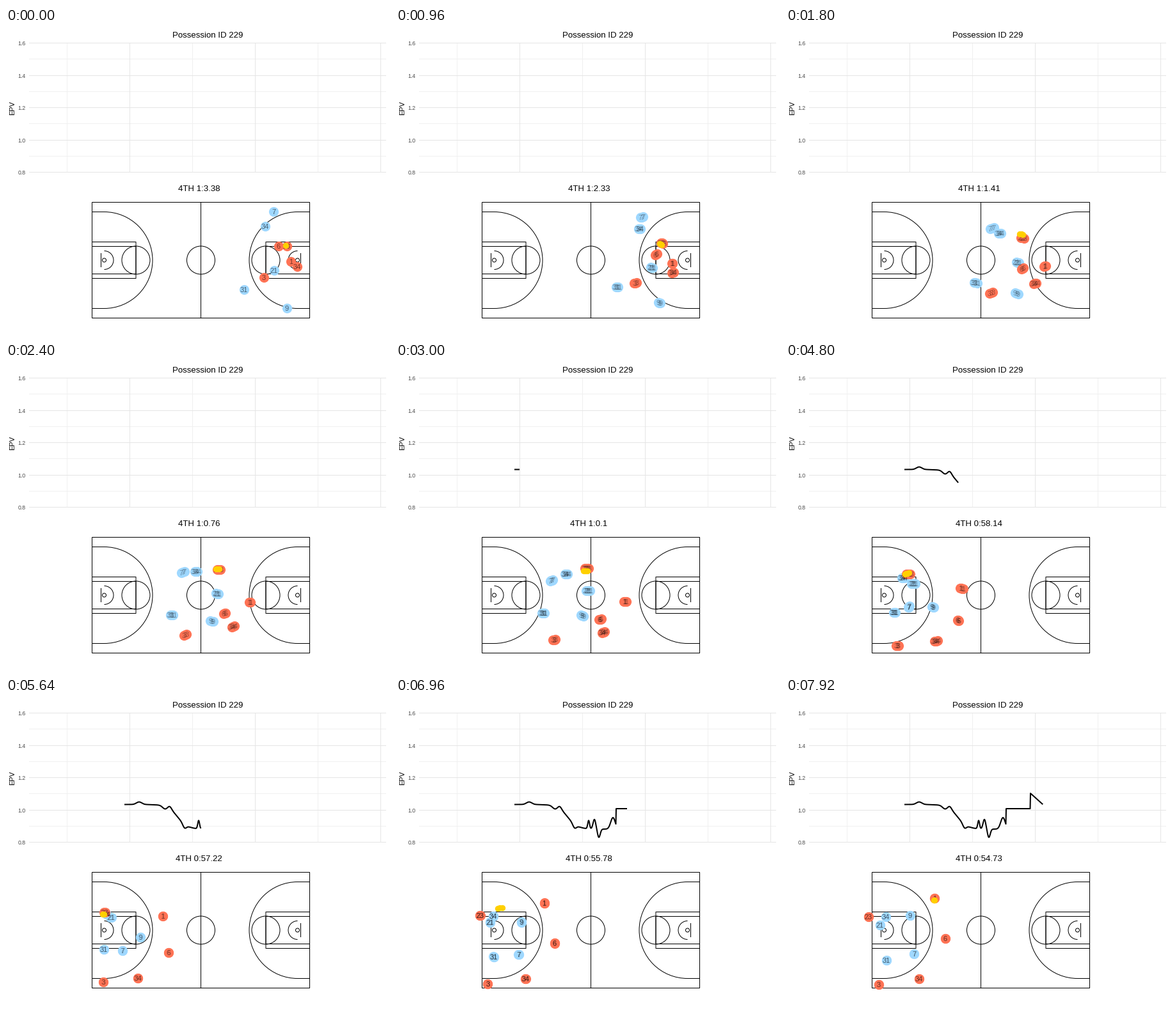
These frames come from a looping animation (600x480 px, 8000 ms). A matplotlib script:

```python
import numpy as np
import matplotlib.pyplot as plt
from matplotlib.animation import FuncAnimation
from matplotlib.patches import Arc, Circle, Rectangle

W, H, DPI = 600, 480, 100
PX = 72 / DPI                 # points per pixel
SUB = 3                       # drawn frames per step
FRAMES, INTERVAL = 200, 40
SAMPLE = 0.305                # one tracking sample, in steps
LAST = 66
PASS, CATCH = 55, 62.5

BLUE, RED, GOLD = "#9fd8ff", "#ff7355", "#ffd000"

# Each run: start, midcourt, set-up spot and end, reached at these steps
KNOTS = np.array([0, 25, 47, LAST], float)
AWAY = {
    "7": [(418, 287), (243, 340), (182, 395), (200, 400)],
    "34": [(405, 310), (266, 330), (157, 338), (156, 342)],
    "21": [(419, 379), (300, 356), (164, 343), (147, 355)],
    "31": [(372, 409), (230, 391), (153, 393), (157, 410)],
    "9": [(439, 438), (291, 395), (210, 374), (194, 340)],
}
HOME = {
    "23": [(439, 341), (298, 321), (154, 335), (129, 342)],
    "6": [(426, 341), (319, 401), (254, 398), (249, 376)],
    "1": [(445, 365), (358, 373), (245, 341), (232, 313)],
    "34": [(455, 373), (324, 421), (206, 438), (208, 439)],
    "3": [(403, 390), (247, 433), (152, 444), (145, 448)],
}


def run(points, t):
    """Smooth curve through the key points, at rest at both ends."""
    p = np.array(points, float)
    v = np.gradient(p, KNOTS, axis=0)
    v[[0, -1]] = 0
    t = min(max(t, 0), LAST)
    i = min(np.searchsorted(KNOTS, t, side="right") - 1, len(KNOTS) - 2)
    d = KNOTS[i + 1] - KNOTS[i]
    u = (t - KNOTS[i]) / d
    return ((1 + 2 * u) * (1 - u) ** 2 * p[i] + u * (1 - u) ** 2 * d * v[i]
            + u * u * (3 - 2 * u) * p[i + 1] + u * u * (u - 1) * d * v[i + 1])


def dribble(t):
    return run(HOME["23"], t) + (-2, 5 * np.cos((t - 25) * np.pi / 10) - 1)


def ball_at(t):
    if t < PASS:
        return dribble(t)
    u = min((t - PASS) / (CATCH - PASS), 1) ** 1.3
    caught = run(HOME["1"], max(t, CATCH)) + (-0.5, 3)
    return dribble(PASS) * (1 - u) + caught * u


def samples(step):
    """Tracking samples that show together in one step."""
    if step == 0:
        return [0.0]
    n = (3 if step < 44 else 2) + (step % 3 == 1)
    return [step + (j - (n - 1) / 2) * SAMPLE for j in range(n)]


def clock(step):
    mins, secs = divmod(63.38 - 0.13106 * step, 60)
    digits = f"{secs:.2f}".rstrip("0").rstrip(".")
    return f"4TH {int(mins)}:{digits}"


def value_curve(x):
    """Slow fall with bumps, then flat during the pass, then a jump and decline."""
    y = 166.5 + 38.5 / (1 + np.exp((268 - x) / 8))
    for centre, width, height in ((208, 6, -4), (248, 5, 4), (256, 4, -4), (279, 4, 6),
                                  (301, 2, -13), (310, 3, -15), (317, 3, 13), (339, 5, -18)):
        y = y + height * np.exp(-((x - centre) / width) ** 2)
    y = np.where(x > 343.5, 173, y)
    return np.where(x > 381.5, 149 + 0.9 * (x - 382), y)


plt.rcParams["font.family"] = "Liberation Sans"
plt.rcParams["path.snap"] = False
fig = plt.figure(figsize=(W / DPI, H / DPI), dpi=DPI, facecolor="white")
ax = fig.add_axes([0, 0, 1, 1])
ax.set_xlim(0, W)
ax.set_ylim(H, 0)
ax.axis("off")


def line(xs, ys, color="black", width=1.0, z=2):
    return ax.plot(xs, ys, color=color, lw=width * PX, zorder=z,
                   solid_capstyle="projecting", solid_joinstyle="round")[0]


def label(x, y, s, px, **kw):
    kw = {"ha": "center", "va": "baseline", "zorder": 5, **kw}
    return ax.text(x, y, s, fontsize=px * PX, **kw)


def ring(x, r):
    ax.add_patch(Circle((x, 363), r, fill=False, lw=PX, zorder=2))


def draw_chart():
    minor, major = "#f0f0f0", "#e5e5e5"
    for i in range(6):
        x = 95.5 + 98 * i
        line([x, x], [24, 225], major if i % 2 else minor, 1, i % 2)
    for i in range(9):
        y = int(23.5 + 25.25 * i) + 0.5
        line([36.5, 593.5], [y, y], minor if i % 2 else major, 1, 1 - i % 2)
        if i % 2 == 0:
            label(31, y + 3.5, f"{1.6 - 0.1 * i:.1f}", 8.8, ha="right", color="#4d4d4d")
    label(315, 15, "Possession ID 229", 13.2)
    label(10, 125, "EPV", 11, rotation=90, va="center")


def draw_half(flip):
    def fx(x):
        return 609 - x if flip else x

    def arc(x, r):
        a = (90, 270) if flip else (-90, 90)
        ax.add_patch(Arc((fx(x), 363), 2 * r, 2 * r, theta1=a[0], theta2=a[1],
                         lw=PX, color="black", zorder=2))

    for y in (287.5, 438.5):
        line([fx(134.5), fx(153.5)], [y, y])
    arc(153.5, 75.5)
    arc(153.5, 14.5)
    ring(fx(153.5), 3)
    ring(fx(203), 22)
    for top, bottom in ((334.5, 391.5), (341.5, 384.5)):
        line([fx(x) for x in (134.5, 203, 203, 134.5)], [top, top, bottom, bottom])
    line([fx(148.5)] * 2, [352.5, 373.5])


def draw_court():
    ax.add_patch(Rectangle((134.5, 272.5), 340, 181, fill=False, lw=PX, zorder=2))
    line([304.5, 304.5], [272.5, 453.5])
    ring(304.5, 22)
    draw_half(False)
    draw_half(True)


def dots(color, diameter, z):
    return ax.scatter([], [], s=(diameter * PX) ** 2, c=color, linewidths=0, zorder=z)


draw_chart()
draw_court()
curve = line([], [], width=2, z=3)
title = label(301.5, 255, "", 13.2)
teams = [(AWAY, dots(BLUE, 15.2, 3)), (HOME, dots(RED, 15.2, 4))]
ball = dots(GOLD, 9.4, 6)
numbers = [(track, [label(0, 0, n, 11) for _ in range(4)])
           for team, _ in teams for n, track in team.items()]


def draw(frame):
    step = frame // SUB
    times = samples(step)
    title.set_text(clock(step))

    xs = np.arange(186, 401 - 5.09 * (LAST - step), 0.5)
    curve.set_data(xs, value_curve(xs))

    for team, marks in teams:
        marks.set_offsets([run(p, t) for p in team.values() for t in times])
    for track, texts in numbers:
        for j, text in enumerate(texts):
            text.set_visible(j < len(times))
            text.set_alpha(0.55 if len(times) == 1 else 0.35)
            if j < len(times):
                x, y = run(track, times[j])
                text.set_position((x, y + 4))
    ball.set_offsets([ball_at(t) for t in times])
    return []


anim = FuncAnimation(fig, draw, frames=FRAMES, interval=INTERVAL,
                     init_func=lambda: draw(0), repeat=True, repeat_delay=0, blit=False)
plt.show()
```
